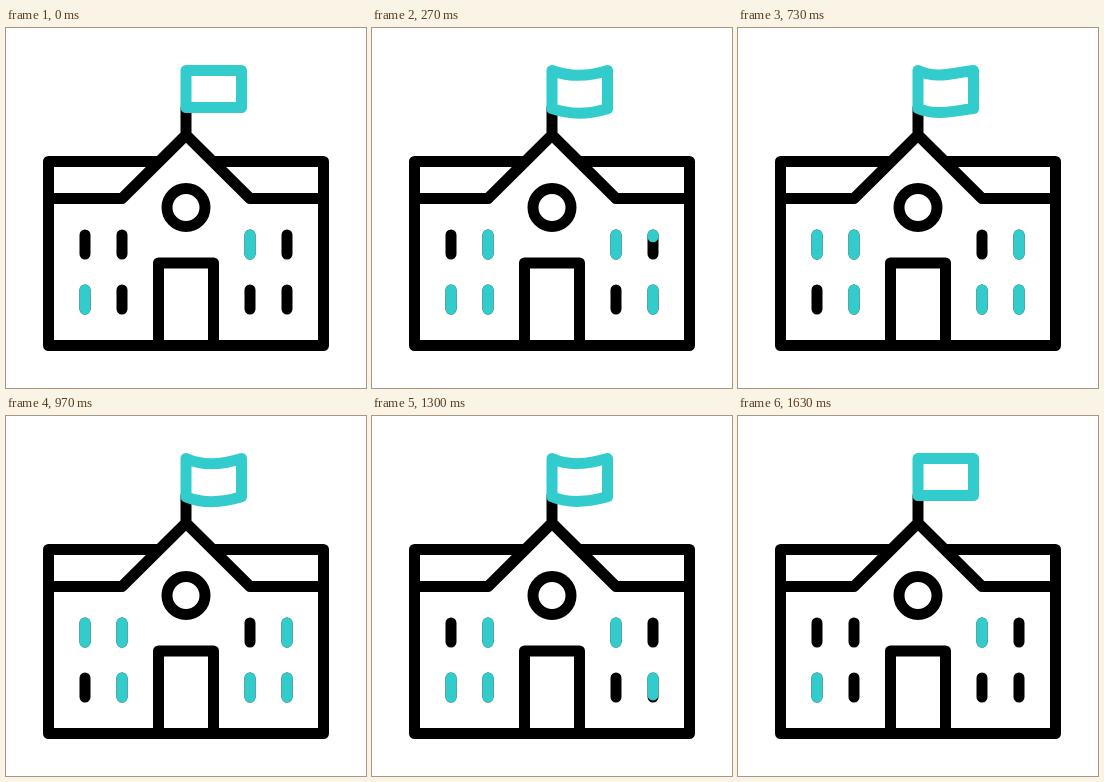
Recreate the animation shown at these times as an HTML page with a canvas. Size 360 by 360 pixels, loop 1670 ms.

```html
<!DOCTYPE html>
<html lang="en">
<head>
<meta charset="utf-8">
<title>School building</title>
<style>
  html, body { margin: 0; width: 100%; height: 100%; overflow: hidden; background: #fff; }
  canvas { display: block; width: 360px; height: 360px; }
</style>
</head>
<body>
<canvas id="stage"></canvas>
<script>
const LOOP = 1670;
const BLACK = '#000', TEAL = '#33cccc';
const canvas = document.getElementById('stage');
const ctx = canvas.getContext('2d');
const dpr = window.devicePixelRatio || 1;
canvas.width = canvas.height = 360 * dpr;

const BUILDING = new Path2D(
  'M180 80V107 M153 133.5H42.5V317.5H317.5V133.5H207' +
  'M42.5 170.5H116L180 107L244 170.5H317.5' +
  'M152.5 317.5V235H207.5V317.5' +
  'M199 179.5A19 19 0 1 1 161 179.5A19 19 0 1 1 199 179.5Z');

// Windows in the order they switch; "lit" is the resting state.
const PANE = 19, TOP = 207, LOW = 262;
const WINDOWS = [
  { x: 116, y: LOW }, { x: 116, y: TOP },
  { x: 281, y: LOW }, { x: 281, y: TOP },
  { x: 79, y: LOW, lit: true }, { x: 244, y: LOW },
  { x: 79, y: TOP }, { x: 244, y: TOP, lit: true }
];
const ON = { start: 90, step: 58.5 };
const OFF = { start: 1044, step: 50.3 };

// Time, then sag of the left and right handles of the cloth.
const WAVE = [
  [0, 0, 0], [30, 0, 0], [270, 7, 6], [470, 7, 10], [730, 9, 2],
  [1170, 8, 9], [1430, 9, 1], [1630, 0, 0], [1670, 0, 0]
];

const clamp = v => Math.min(1, Math.max(0, v));
const mix = (a, b, k) => a + (b - a) * k;

function stroke(path, color) {
  ctx.strokeStyle = color;
  ctx.stroke(path);
}

function bar(x, y, length, color) {
  const path = new Path2D();
  path.moveTo(x, y);
  path.lineTo(x, y + length);
  stroke(path, color);
}

function drawWindow(win, i, t) {
  const rise = clamp((t - ON.start - i * ON.step) / ON.step);
  const fall = clamp((t - OFF.start - (7 - i) * OFF.step) / OFF.step);
  const change = rise - fall;
  const fill = win.lit ? 1 - change : change;
  bar(win.x, win.y, PANE, BLACK);
  if (fill > 0) bar(win.x, win.y, PANE * fill, TEAL);
}

function sagAt(t) {
  const i = Math.max(1, WAVE.findIndex(key => key[0] > t));
  const a = WAVE[i - 1], b = WAVE[i];
  const k = clamp((t - a[0]) / (b[0] - a[0]));
  const ease = k * k * (3 - 2 * k);
  return [mix(a[1], b[1], ease), mix(a[2], b[2], ease)];
}

function drawFlag(t) {
  const [left, right] = sagAt(t);
  const x0 = 180, x1 = 235.5, y0 = 42.5, y1 = 79.5;
  const lower = 0.15 * (left + right);
  const third = (x1 - x0) / 3;
  const flag = new Path2D();
  flag.moveTo(x0, y0);
  flag.bezierCurveTo(x0 + third, y0 + left, x1 - third, y0 + right, x1, y0);
  flag.lineTo(x1, y1 + lower * 0.6);
  flag.bezierCurveTo(x1 - third, y1 + lower + right * 0.8,
    x0 + third, y1 + lower + left * 0.8, x0, y1 + lower * 0.6);
  flag.closePath();
  stroke(flag, TEAL);
}

function draw(t) {
  ctx.setTransform(dpr, 0, 0, dpr, 0, 0);
  ctx.fillStyle = '#fff';
  ctx.fillRect(0, 0, 360, 360);
  ctx.lineWidth = 11;
  ctx.lineCap = ctx.lineJoin = 'round';
  stroke(BUILDING, BLACK);
  WINDOWS.forEach((win, i) => drawWindow(win, i, t));
  drawFlag(t);
}

const begin = performance.now();
function tick() {
  draw((performance.now() - begin) % LOOP);
  requestAnimationFrame(tick);
}
tick();
</script>
</body>
</html>
```
